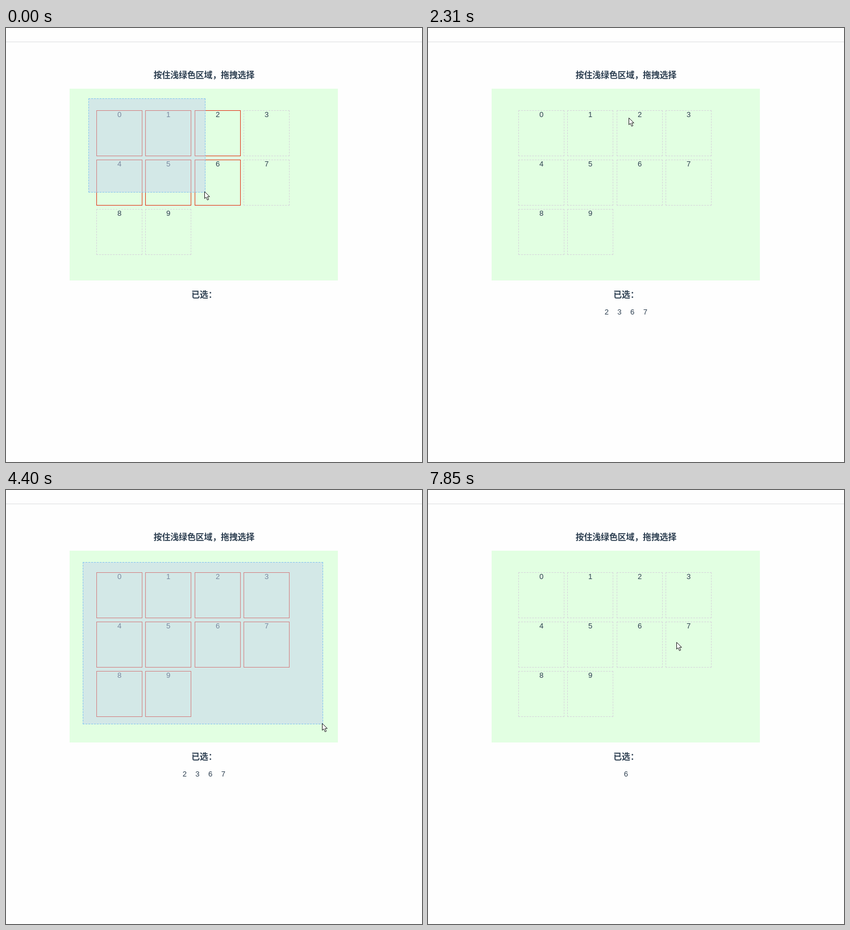
An HTML page that plays this animation: 732x765 px, repeating every 8000 ms.

```html
<!DOCTYPE html>
<html lang="zh-CN">
<head>
<meta charset="utf-8">
<title>拖拽选择</title>
<style>
  html, body { margin: 0; width: 100%; height: 100%; overflow: hidden; background: #fefefe; }
  body { position: relative; color: #2c3e50; font: 13px "Liberation Sans", Arial, sans-serif; text-align: center; }
  body * { position: absolute; box-sizing: border-box; }
  .rule { left: 0; top: 24px; width: 100%; height: 1px; background: #dedfe2; }
  h3 { left: 112px; width: 473px; margin: 0; font: bold 14.8px/20px "Noto Sans CJK SC", "Noto Sans CJK", sans-serif; }
  .panel { left: 112px; top: 107px; width: 472px; height: 338px; background: #e2ffe2; }
  .cell { width: 81px; height: 81px; line-height: 13px; border: 1px dashed #d6d4db; }
  .cell.on { border: 1px solid #e2361c; }
  .picked { width: 20px; top: 493px; line-height: 16px; }
  #band { background: rgba(198, 209, 238, .5); border: 1px dashed #86c5ef; }
  #cursor { left: 0; top: 0; width: 12px; height: 18px; }
</style>
</head>
<body>
<div class="rule"></div>
<h3 style="top:72px">按住浅绿色区域，拖拽选择</h3>
<div class="panel"></div>
<h3 style="top:459px">已选：</h3>
<div id="band"></div>
<svg id="cursor" viewBox="0 0 12 18">
  <path d="M.5 .5V12.6L3.2 10.1L5.4 15.2L7.6 14.2L5.4 9.3H9.3Z" fill="#fff" stroke="#222" stroke-width="1"/>
</svg>
<script>
const LOOP = 8000, TICKS = 58, TICK = LOOP / TICKS, LEAD = 26;
const SIZE = 81, PITCH = 86.6;
const LAG = 0.4; // the selection band trails the pointer, in ticks

const linear = u => u;
const out = u => 1 - (1 - u) ** 3;

// A small recorder for the hand's actions; durations are in ticks.
const moves = [], drags = [];
let now = 0, at = [349, 288];

function move(ticks, x, y, ease = out) {
  moves.push({ from: now, to: now += ticks, a: at, b: at = [x, y], ease });
}
const rest = ticks => move(ticks, ...at);
const press = (x = at[0], y = at[1]) => drags.push({ from: now, to: Infinity, x, y });
const release = () => { drags[drags.length - 1].to = now; };

press(145, 124);
rest(3);
release();

rest(2);
move(5, 537, 342);
press();
move(3, 353, 158);
rest(2);
release();

rest(1);
move(6, 135, 127);
press();
move(2, 239, 190, linear);
move(6, 556, 411);
rest(3);
release();

rest(1);
move(7, 371, 374, linear);
move(1, 308, 388);
press();
move(4, 452, 426);
rest(1);
release();

move(3, 347, 213, linear);
move(1, 346, 229);
press();
move(3, 386, 268);
release();
move(3, 437, 268);

const band = document.getElementById('band');
const cursor = document.getElementById('cursor');

function add(cls, text) {
  const el = document.createElement('div');
  el.className = cls;
  el.textContent = text;
  document.body.insertBefore(el, band);
  return el;
}

const cells = Array.from({ length: 10 }, (_, i) => {
  const x = Math.round(158.6 + PITCH * (i % 4));
  const y = Math.round(145.4 + PITCH * Math.floor(i / 4));
  const el = add('cell', i);
  el.style.left = x + 'px';
  el.style.top = y + 'px';
  return { el, x, y };
});
const labels = cells.map((_, i) => add('picked', i));

function pointer(k) {
  const m = moves.find(m => k <= m.to) || moves[moves.length - 1];
  const u = m.ease(Math.min(1, (k - m.from) / (m.to - m.from)));
  return m.a.map((v, i) => Math.floor(v + (m.b[i] - v) * u));
}

// dragging back keeps the pressed pixel inside the band
const span = (start, tip) => tip < start ? [tip + 1, start + 1] : [start, tip + 2];

function bandBox(drag, k) {
  const [px, py] = pointer(Math.max(k - LAG, drag.from));
  const [l, r] = span(drag.x, px), [t, b] = span(drag.y, py);
  return { l, t, r, b };
}

const hits = (c, q) => q.l < c.x + SIZE && q.r > c.x && q.t < c.y + SIZE && q.b > c.y;

for (const d of drags) {
  const box = bandBox(d, d.to);
  d.result = [...cells.keys()].filter(i => hits(cells[i], box));
}

function draw(k) {
  const [x, y] = pointer(k);
  cursor.style.transform = `translate(${x}px, ${y}px)`;

  const drag = drags.find(d => k >= d.from && k < d.to);
  const box = drag && bandBox(drag, k);
  band.style.display = box ? 'block' : 'none';
  if (box) {
    band.style.left = box.l + 'px';
    band.style.top = box.t + 'px';
    band.style.width = box.r - box.l + 'px';
    band.style.height = box.b - box.t + 'px';
  }
  cells.forEach(c => c.el.classList.toggle('on', !!box && hits(c, box)));

  const done = drags.filter(d => d.to <= k).pop();
  const picked = done ? done.result : [];
  labels.forEach((el, i) => {
    const n = picked.indexOf(i);
    el.style.display = n < 0 ? 'none' : 'block';
    el.style.left = 338.3 + (n - (picked.length - 1) / 2) * 22.7 + 'px';
  });
}

const start = performance.now();
function frame() {
  const t = (performance.now() - start) % LOOP;
  draw(Math.min(TICKS - 1, Math.floor((t + LEAD) / TICK)));
  requestAnimationFrame(frame);
}
frame();
</script>
</body>
</html>
```
